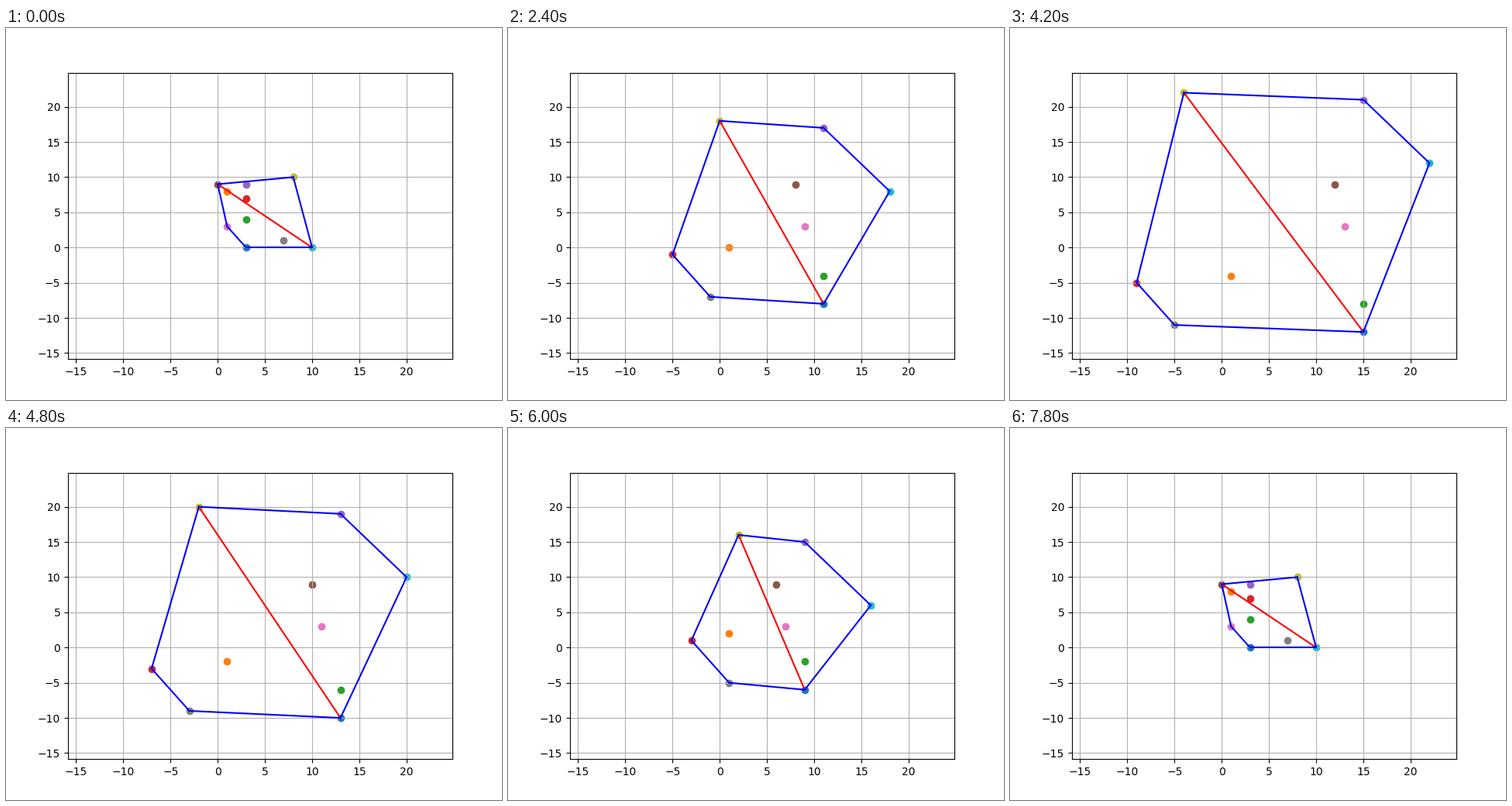
A matplotlib script for the animation above (8000 ms loop, 640 by 480 pixels).

```python
import math
from itertools import combinations

import matplotlib.pyplot as plt
import numpy as np
from matplotlib.animation import FuncAnimation

INTERVAL = 100       # ms per animation frame
FRAMES = 80
HOLD = 3             # frames between two moves
TURN = 13            # moves outward before the points come back

# One key point per dot: x, y and heading in eighths of a turn.
x, y, heading = np.transpose([
    (3, 0, -1), (1, 8, -2), (3, 4, -1), (3, 7, -3), (3, 9, 1),
    (0, 9, 0), (1, 3, 0), (7, 1, -3), (8, 10, 3), (10, 0, 1)])
start = np.column_stack([x, y])
angle = heading * math.pi / 4
velocity = np.rint(np.column_stack([np.cos(angle), np.sin(angle)]))


def half_hull(points):
    chain = []
    for px, py in points:
        while len(chain) > 1:
            (ax_, ay), (bx, by) = chain[-2:]
            if (bx - ax_) * (py - ay) - (by - ay) * (px - ax_) > 0:
                break
            chain.pop()
        chain.append((px, py))
    return chain


def convex_hull(points):
    """Closed outline of the points, counter-clockwise."""
    ordered = sorted(points)
    return half_hull(ordered) + half_hull(ordered[::-1])[1:]


def diameter(points):
    return max(combinations(points, 2), key=lambda pair: math.dist(*pair))


fig, ax = plt.subplots(figsize=(6.4, 4.8), dpi=100)
ax.set(xlim=(-15.85, 24.85), ylim=(-15.85, 24.85))
ax.grid(True)
dots = [ax.scatter(*point) for point in start]
diameter_line, = ax.plot([], [], "r")
edges = [ax.plot([], [], "b")[0] for _ in start]


def update(frame):
    offset = TURN - abs(TURN - frame // HOLD)
    positions = start + offset * velocity
    for dot, position in zip(dots, positions):
        dot.set_offsets([position])
    hull = convex_hull([tuple(p) for p in positions.tolist()])
    diameter_line.set_data(*zip(*diameter(hull)))
    for edge in edges:
        edge.set_data([], [])
    # Separate lines keep each side's own end caps and pixel snapping.
    for edge, side in zip(edges, zip(hull, hull[1:])):
        edge.set_data(*zip(*side))
    return [*dots, diameter_line, *edges]


animation = FuncAnimation(fig, update, frames=FRAMES, interval=INTERVAL,
                          repeat=True, repeat_delay=0)
plt.show()
```
